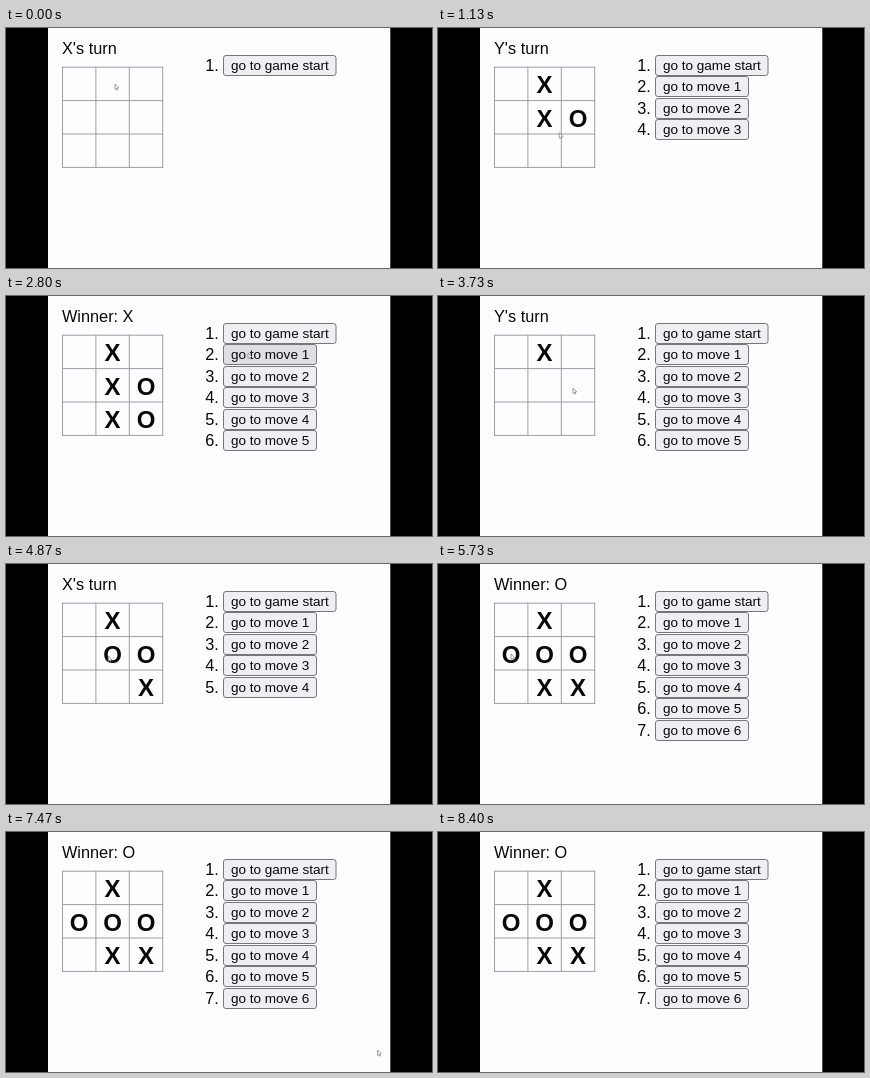
These frames come from a looping animation (426 px wide and 240 px high, 8.47 s). An HTML page with a canvas:

```html
<!DOCTYPE html>
<html lang="en">
<head>
<meta charset="utf-8">
<title>Tic-tac-toe</title>
<style>
html, body { margin: 0; width: 100%; height: 100%; overflow: hidden; background: #000; }
canvas { display: block; width: 426px; height: 240px; }
</style>
</head>
<body>
<canvas id="stage" width="426" height="240"></canvas>
<script>
const ctx = document.getElementById('stage').getContext('2d');
const LOOP = 8470, STEP = LOOP / 127;
const FONT = '"Liberation Sans", Arial, sans-serif';
const GRID = { x: 56.5, y: 39.2, cell: 33.4 };
const ROW = { x: 217.5, y: 27.5, pitch: 21.45, h: 20 };
const DWELL = 100, GLIDE = 600;

// Pointer clicks: time, x, y. What a click does follows from where it lands.
const CLICKS = [
  [260, 109, 56], [600, 138, 89], [930, 108, 91], [1360, 139, 123],
  [1870, 108, 123], [3000, 242, 57], [3930, 135, 92], [4330, 139, 123],
  [4730, 102, 90], [5200, 107, 123], [5730, 73, 90], [7000, 324, 153],
  [7800, 395, 250]
];

function cellAt(x, y) {
  const col = Math.floor((x - GRID.x) / GRID.cell);
  const row = Math.floor((y - GRID.y) / GRID.cell);
  return Math.min(col, row) >= 0 && Math.max(col, row) < 3 ? row * 3 + col : -1;
}

function rowBox(i) {
  return { x: ROW.x, y: Math.floor(ROW.y + i * ROW.pitch) + 0.5, w: i ? 93 : 112.5, h: ROW.h };
}

function inside({ x, y, w, h }, px, py) {
  return px > x && px < x + w && py > y && py < y + h;
}

function winner(board) {
  const same = (from, by) => {
    const m = board[from];
    return m === board[from + by] && m === board[from + 2 * by] ? m : '';
  };
  let won = same(0, 4) || same(2, 2);
  for (let i = 0; i < 3; i++) won = won || same(3 * i, 1) || same(i, 3);
  return won;
}

function gameAt(t) {
  let moves = [], shown = 0;
  for (const [at, x, y] of CLICKS) {
    if (at > t) break;
    const cell = cellAt(x, y);
    if (cell >= 0) {
      moves = [...moves.slice(0, shown), cell];
      shown = moves.length;
    }
    for (let i = 0; i <= moves.length; i++) {
      if (inside(rowBox(i), x, y)) shown = i;
    }
  }
  const board = Array(9).fill('');
  moves.slice(0, shown).forEach((c, i) => { board[c] = i % 2 ? 'O' : 'X'; });
  const won = winner(board);
  const status = won ? 'Winner: ' + won : (shown % 2 ? 'Y' : 'X') + "'s turn";
  return { board, status, rows: moves.length + 1 };
}

// Rest briefly after a click, then ease to the next spot and wait there.
function pointerAt(t) {
  const next = CLICKS.findIndex(c => c[0] > t);
  if (next <= 0) {
    const [, x, y] = CLICKS.at(next);
    return { x, y };
  }
  const [t0, x0, y0] = CLICKS[next - 1], [t1, x1, y1] = CLICKS[next];
  const span = Math.min(GLIDE, t1 - t0 - 2 * DWELL);
  const k = Math.max(0, Math.min(1, (t - t0 - DWELL) / span));
  const s = k * k * (3 - 2 * k);
  return { x: x0 + (x1 - x0) * s, y: y0 + (y1 - y0) * s };
}

function text(str, x, y, size, align = 'left', weight = '') {
  ctx.font = `${weight} ${size}px ${FONT}`;
  ctx.textAlign = align;
  ctx.fillStyle = '#080808';
  ctx.fillText(str, x, y);
}

function drawBoard(board) {
  const { x, y, cell } = GRID;
  const end = 3 * cell + 0.5;
  ctx.strokeStyle = '#a09ea6';
  ctx.lineWidth = 1;
  ctx.beginPath();
  for (let i = 0; i < 4; i++) {
    const d = i * cell;
    ctx.moveTo(x + d, y - 0.5);
    ctx.lineTo(x + d, y + end);
    ctx.moveTo(x - 0.5, y + d);
    ctx.lineTo(x + end, y + d);
  }
  ctx.stroke();
  board.forEach((m, i) => {
    text(m, x + (i % 3 + 0.5) * cell, y + Math.floor(i / 3) * cell + 26, 24, 'center', 'bold');
  });
}

function drawRow(i, p) {
  const box = rowBox(i), { x, y, w, h } = box;
  ctx.beginPath();
  ctx.roundRect(x, y, w, h, 2.5);
  ctx.fillStyle = inside(box, p.x, p.y) ? '#dfdfe3' : '#efeff3';
  ctx.fill();
  ctx.strokeStyle = '#77777b';
  ctx.lineWidth = 1;
  ctx.stroke();
  text(i ? 'go to move ' + i : 'go to game start', x + 7.4, y + 14.7, 13.55);
  text(i + 1 + '.', 212.8, y + 15, 16.3, 'right');
}

function drawPointer({ x, y }) {
  ctx.beginPath();
  ctx.moveTo(x, y);
  ctx.lineTo(x, y + 5.4);
  ctx.lineTo(x + 1.3, y + 4.4);
  ctx.lineTo(x + 2.4, y + 6.2);
  ctx.lineTo(x + 2.4, y + 4);
  ctx.lineTo(x + 3.7, y + 3.9);
  ctx.closePath();
  ctx.fillStyle = '#fff';
  ctx.fill();
  ctx.strokeStyle = '#77737b';
  ctx.lineWidth = 0.7;
  ctx.stroke();
}

function draw(t) {
  const game = gameAt(t), p = pointerAt(t);
  ctx.fillStyle = '#fdfdfd';
  ctx.fillRect(0, 0, 426, 240);
  text(game.status, 56, 26, 16.3);
  drawBoard(game.board);
  for (let i = 0; i < game.rows; i++) drawRow(i, p);
  drawPointer(p);
  ctx.fillStyle = '#000';
  ctx.fillRect(0, 0, 42, 240);
  ctx.fillRect(384.3, 0, 42, 240);
}

const start = performance.now();
function tick() {
  const t = (performance.now() - start) % LOOP;
  draw(Math.min(126, Math.floor((t + 5) / STEP)) * STEP);
  requestAnimationFrame(tick);
}
tick();
</script>
</body>
</html>
```
